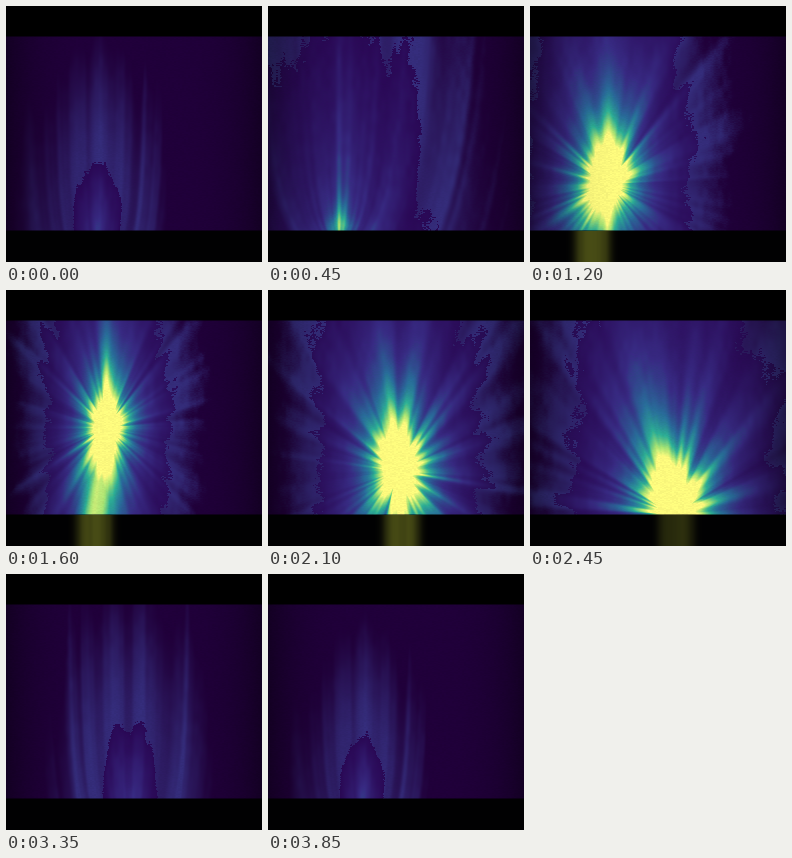
Recreate the animation shown at these times as an HTML page with a canvas. Size 256 px wide and 256 px high, loop 3900 ms.

```html
<!DOCTYPE html>
<html lang="en">
<head>
<meta charset="utf-8">
<title>Glow</title>
<style>
html, body { margin: 0; width: 100%; height: 100%; overflow: hidden; background: #000; }
canvas { display: block; width: 100vw; height: 100vh; }
</style>
</head>
<body>
<canvas id="stage" width="256" height="256"></canvas>
<script>
const LOOP = 3900, STEP = 50, TOP = 30, FLOOR = 225;
const ctx = document.getElementById('stage').getContext('2d');
const img = ctx.createImageData(256, 256);
const px = img.data;

const RAMP = [[40, 4, 80], [55, 42, 130], [40, 108, 153], [44, 174, 148], [165, 226, 115], [253, 250, 125]];
const NIGHT = [32, 0, 58], FRINGE = [52, 44, 122], FLOOR_DARK = [1, 1, 2], FLOOR_LIT = [68, 72, 20];

const clamp = v => v < 0 ? 0 : v > 1 ? 1 : v;
const mix = (a, b, k) => a + (b - a) * k;
const ease = k => k * k * (3 - 2 * k);
const ramp = (t, a, b) => ease(clamp((t - a) / (b - a)));
const pulse = (t, a, b, c, d) => ramp(t, a, b) * (1 - ramp(t, c, d));

function hash(x, y) {
  let h = Math.imul(x, 374761393) + Math.imul(y, 668265263);
  h = Math.imul(h ^ (h >>> 13), 1274126177);
  return ((h ^ (h >>> 16)) >>> 0) / 4294967296;
}

// Value noise, periodic in y when wrap is given
function noise(x, y, wrap) {
  const i = Math.floor(x), j = Math.floor(y);
  const u = ease(x - i), v = ease(y - j);
  const n = wrap ? (j + 1) % wrap : j + 1;
  return mix(mix(hash(i, j), hash(i + 1, j), u), mix(hash(i, n), hash(i + 1, n), u), v);
}

// The glow sways sideways, opens, rises off the floor, sinks and closes
function poseAt(time) {
  const t = time > 3700 ? time - LOOP : time;
  const lift = Math.exp(-(((t - 1640) / 650) ** 2));
  const open = pulse(t, -100, 750, 2600, 3500);
  const heat = pulse(t, 300, 750, 2500, 3200);
  const cx = 106 - 39 * Math.cos((t - 720) / LOOP * 2 * Math.PI);
  return {
    cx, lift, heat,
    cy: 222 - 85 * lift,
    footX: cx - (120 - cx) * .6 * lift,
    w: 22 + open * 95 - 55 * lift,
    h: 58 + open * 220 + 100 * lift,
    fringe: mix(2, .52, open),
    rx: 4 + heat * (16 - 9 * lift),
    ry: 6 + heat * (25 + 2 * lift),
    tail: .72 * lift * heat,
    mirror: pulse(t, 550, 1150, 2200, 2800)
  };
}

function put(x, y, a, b, k, light) {
  const o = (y * 256 + x) * 4;
  for (let c = 0; c < 3; c++) px[o + c] = mix(a[c], b[c], k) * light;
}

function render(t) {
  const { cx, lift, heat, cy, footX, w, h, fringe, rx, ry, tail, mirror } = poseAt(t);
  const phase = t / LOOP * 8, tick = Math.round(t / STEP);
  const fan = clamp(.15 + heat), rayY = cy + 25 * (1 - lift);

  for (let y = TOP; y < FLOOR; y++) {
    const tx = mix(cx, footX, clamp((y - cy) / (FLOOR - cy)));
    const coreW = rx * (1 - .3 * clamp((cy - y) / ry));
    const dy = y - cy;
    const edge = y === TOP || y === FLOOR - 1 ? .5 : 1;
    for (let x = 0; x < 256; x++) {
      const dx = x - tx;
      const along = mix((x - cx) / 9, Math.atan2(x - cx, rayY - y) * 7, fan) + 60;
      const ray = noise(along, phase, 8) * .65 + noise(along * 2.3 + 40, phase, 8) * .35 - .5;
      const grain = hash(x >> 1, y + tick * 311) - .5;
      const rough = noise(x / 5, y / 11 + 30) - .5;

      const d = Math.hypot((x - cx) / w, (222 - y) / h) * (1 - .42 * ray) + rough * .13 + grain * .07;
      const light = edge * (1 - .4 * ((x - 128) / 128) ** 4 + grain * .05);

      if (d > 1) {
        const f = ease(clamp(1 - (d - 1) / fringe));
        put(x, y, NIGHT, FRINGE, clamp(Math.pow(f, .75) * (.9 + .8 * ray)), light);
        continue;
      }
      const q = Math.hypot(dx / coreW, dy / ry) / (1 + .45 * ray);
      const far = Math.hypot(dx / (rx * 2.2), dy / (ry * (3.2 - 1.5 * lift)));
      const core = 1.3 / (1 + .55 * Math.pow(q, 2.6));
      const halo = .4 * Math.exp(-1.2 * far) * (1 + 1.8 * ray);
      let u = .02 + .2 * Math.pow(Math.max(0, 1 - d), 1.2) * (1 + ray) + heat * (core + halo);
      if (dy > 0) u = Math.max(u, tail * Math.exp(-((dx / 18) ** 2)) * (1 + .3 * ray) + .15 * (1 - d));
      const r = clamp(u) * 4.999, i = Math.floor(r);
      put(x, y, RAMP[i], RAMP[i + 1], r - i, light);
    }
  }

  for (let y = FLOOR; y < 256; y++) {
    for (let x = 0; x < 256; x++) {
      const glow = mirror * Math.exp(-(((x - footX) / 18) ** 4));
      put(x, y, FLOOR_DARK, FLOOR_LIT, glow * (.9 + .2 * noise(x / 4, phase, 8)), 1);
    }
  }
  ctx.putImageData(img, 0, 0);
}

for (let i = 3; i < px.length; i += 4) px[i] = 255;

const start = performance.now();
let shown = -1;
function play() {
  const t = Math.floor((performance.now() - start) % LOOP / STEP) * STEP;
  if (t !== shown) render(shown = t);
  requestAnimationFrame(play);
}
play();
</script>
</body>
</html>
```
